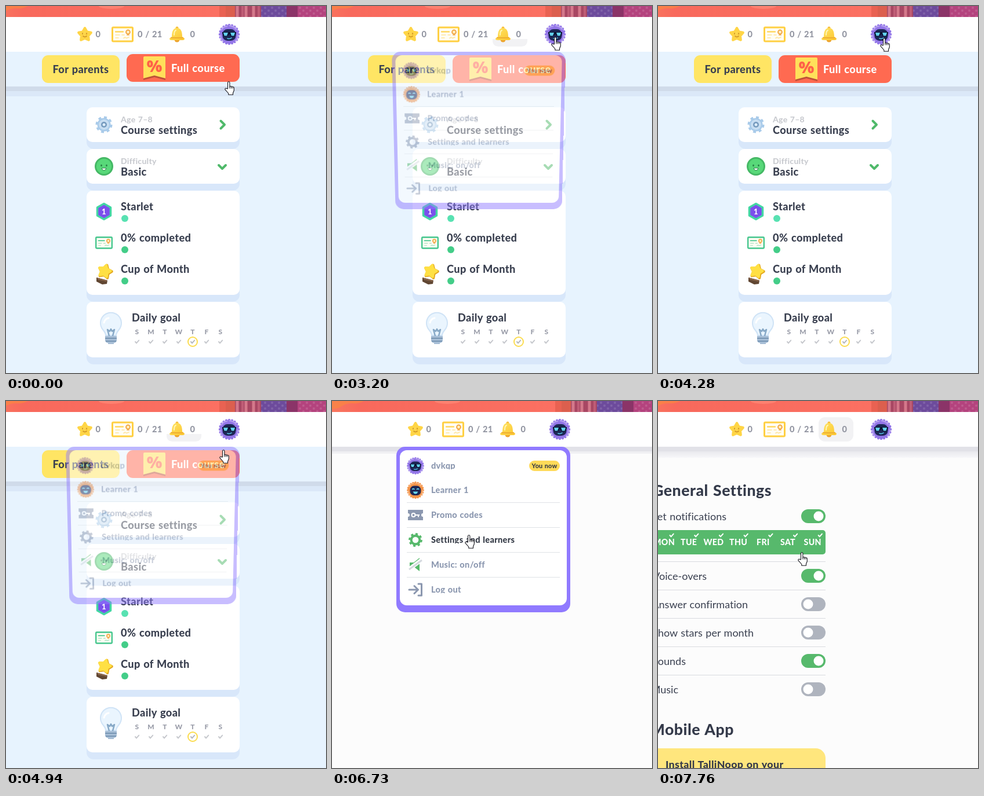
These frames come from a looping animation (552 by 634 pixels, 8000 ms). An HTML page:

```html
<!DOCTYPE html>
<html lang="en">
<head>
<meta charset="utf-8">
<title>Learner menu and settings</title>
<style>
html, body { margin: 0; width: 100%; height: 100%; overflow: hidden; background: #fcfcfc; }
#stage { position: absolute; left: 0; top: 0; width: 552px; height: 634px; overflow: hidden; }
#stage > svg { position: absolute; left: 0; top: 0; }
text {
  font-family: Lato, "Open Sans", sans-serif; font-weight: 800; font-variant-ligatures: none;
  letter-spacing: .02em; word-spacing: .05em;
}
.big { font-size: 18.2px; fill: #3a4050; }
.small { font-size: 14px; fill: #c9cbd0; }
.count { font-size: 14.6px; fill: #9396a2; }
.item { font-size: 14.6px; fill: #8c98b0; }
.label { font-size: 18px; font-weight: 400; fill: #3a4050; text-anchor: end; letter-spacing: 0; }
.title { font-size: 26.6px; fill: #343a4a; text-anchor: end; }
.mid { text-anchor: middle; }
.line { fill: none; stroke-linecap: round; stroke-linejoin: round; }

.anim { animation: 8s step-end -6ms infinite; }
#home { animation-name: home; }
#head { animation-name: head; }
#strip { animation-name: strip; }
#offer { animation-name: offer; }
#haze, #pill { animation-name: late; }
#halfPill { animation-name: halfPill; }
#settings { animation-name: settings; }
#menu { animation-name: menu; transform-origin: 253px 79px; }
#hotText { animation-name: hotText; }
#hotIcon { animation-name: hotIcon; }
#pointer { animation-name: pointer; }
#hand { animation-name: hand; }
#arrow { animation-name: arrow; }

@keyframes home { 0% { opacity: 1 } 84.125% { opacity: 0 } }
@keyframes head { 0% { transform: none } 84.125% { transform: translateX(8px) } 85.875% { transform: none } }
@keyframes strip { 0% { transform: none } 84.125% { transform: translateX(17px) } 85.875% { transform: none } }
@keyframes offer {
  0% { transform: translateY(-2px) } 1.875% { transform: translateY(-1px) } 3.375% { transform: none }
  27.25% { transform: translateY(-1px) } 28.75% { transform: translateY(-2px) }
  30.5% { transform: translateY(-1px) } 32% { transform: none }
}
@keyframes late { 0% { opacity: 0 } 85.875% { opacity: 1 } }
@keyframes halfPill { 0% { opacity: 0 } 40% { opacity: 1 } 49% { opacity: 0 } 61.75% { opacity: 1 } 84.125% { opacity: 0 } }
@keyframes settings { 0% { opacity: 0 } 92.5% { opacity: .4 } 94% { opacity: .75 } 95.5% { opacity: .95 } 97% { opacity: 1 } }
@keyframes menu {
  0% { opacity: 0; transform: none }
  40% { opacity: .5; transform: perspective(700px) rotateX(-6.4deg) }
  41.5% { opacity: .9; transform: perspective(700px) rotateX(-1.2deg) }
  43% { opacity: 1; transform: none }
  46% { opacity: .8; transform: perspective(700px) rotateX(-3deg) }
  47.5% { opacity: .3; transform: perspective(700px) rotateX(-12deg) }
  49% { opacity: 0; transform: none }
  61.75% { opacity: .5; transform: perspective(700px) rotateX(-6.4deg) }
  63.25% { opacity: .9; transform: perspective(700px) rotateX(-1.2deg) }
  64.75% { opacity: 1; transform: none }
  84.125% { opacity: 1; transform: translateX(8px) }
  85.875% { opacity: .8; transform: translateX(8px) perspective(700px) rotateX(-3deg) }
  87.375% { opacity: .3; transform: translateX(8px) perspective(700px) rotateX(-12deg) }
  88.875% { opacity: 0; transform: none }
}
@keyframes hotText { 0% { fill: #8c98b0 } 66.25% { fill: #343a46 } }
@keyframes hotIcon { 0% { color: #8c98b0 } 66.25% { color: #57b96c } }
@keyframes pointer {
  0% { transform: translate(377px, 130px) } 1.875% { transform: translate(381px, 135px) }
  3.375% { transform: translate(388px, 142px) } 4.875% { transform: translate(390px, 145px) }
  25.75% { transform: translate(397px, 135px) } 27.25% { transform: translate(387px, 108px) }
  28.75% { transform: translate(382px, 79px) } 30.5% { transform: translate(378px, 64px) }
  32% { transform: translate(376px, 58px) } 33.75% { transform: translate(377px, 55px) }
  35.25% { transform: translate(378px, 53px) } 46% { transform: translate(377px, 55px) }
  49% { transform: translate(376px, 57px) } 50.5% { transform: translate(372px, 62px) }
  52% { transform: translate(377px, 59px) } 53.5% { transform: translate(383px, 55px) }
  61.75% { transform: translate(368px, 84px) } 63.25% { transform: translate(330px, 132px) }
  64.75% { transform: translate(285px, 186px) } 66.25% { transform: translate(250px, 220px) }
  67.75% { transform: translate(234px, 229px) } 69.25% { transform: translate(229px, 231px) }
  90.75% { transform: translate(234px, 237px) } 92.5% { transform: translate(238px, 247px) }
  94% { transform: translate(240px, 255px) } 95.5% { transform: translate(241px, 259px) }
  97% { transform: translate(241px, 261px) }
}
@keyframes hand { 0% { opacity: 1 } 3.375% { opacity: 0 } 27.25% { opacity: 1 } 90.75% { opacity: 0 } 94% { opacity: 1 } }
@keyframes arrow { 0% { opacity: 0 } 3.375% { opacity: 1 } 27.25% { opacity: 0 } 90.75% { opacity: 1 } 94% { opacity: 0 } }
</style>
</head>
<body>
<div id="stage">
<svg width="552" height="634">
  <defs>
    <linearGradient id="coral"><stop stop-color="#f9775f"/><stop offset=".12" stop-color="#f8695c"/><stop offset="1" stop-color="#fb7062"/></linearGradient>
    <linearGradient id="fade" x2="0" y2="1"><stop stop-color="#e9e9ee"/><stop offset="1" stop-color="#f7f7f9"/></linearGradient>
    <linearGradient id="gold" x2="1" y2="1"><stop stop-color="#ffe566"/><stop offset="1" stop-color="#fcc52f"/></linearGradient>
    <pattern id="dots" width="12" height="10" patternUnits="userSpaceOnUse"><circle cx="3" cy="3" r="2" fill="#fff" opacity=".13"/><circle cx="9" cy="8" r="2" fill="#fff" opacity=".13"/></pattern>
    <path id="star" d="M0-10 3.2-4.4 9.5-3.1 5.2 1.7 5.9 8.1 0 5.5-5.9 8.1-5.2 1.7-9.5-3.1-3.2-4.4Z" stroke-linejoin="round" stroke-width="4"/>
    <path id="check" class="line" d="M-3 0-1 2.4 3.2-2.4" stroke-width="2"/>
    <g id="gear">
      <circle r="9" fill="none" stroke="currentColor" stroke-width="5"/>
      <circle r="12" fill="none" stroke="currentColor" stroke-width="5" pathLength="16" stroke-dasharray="1 1"/>
    </g>
    <g id="diploma">
      <rect x="-17.5" y="-12" width="35" height="24" rx="1.5" fill="#fffdf4" stroke="currentColor" stroke-width="3"/>
      <path class="line" d="M-12-4.5H1" stroke="currentColor" stroke-width="2.2"/>
      <path class="line" d="M-12 1H-5M-1 1H3M-12 6H-7M2 6.500 4.500 5 6.500 6.500 11 5" stroke="currentColor" stroke-width="1.5" opacity=".5"/>
      <path d="M7.5-2H11.500V2.500L9.500 1.500 7.500 2.500Z" fill="#f3b25c"/>
      <circle cx="9.500" cy="-4" r="3.400" fill="#fff0c4" stroke="#f3a847" stroke-width="2"/>
    </g>
    <g id="hair">
      <circle r="16" fill="currentColor"/>
      <circle r="16" fill="none" stroke="currentColor" stroke-width="4.500" stroke-linecap="round" pathLength="20" stroke-dasharray="0 1"/>
      <path class="line" d="M-13-8Q-10-14-4-14M1-15Q8-14 12-9M-15 2Q-15 8-11 12M15 1Q15 8 11 12" stroke="#fff" stroke-width="2.500" opacity=".28"/>
      <rect x="-11.5" y="-9" width="23" height="20" rx="8.500" fill="#1d2755"/>
    </g>
    <g id="cool">
      <use href="#hair"/>
      <path d="M-12-4H12V-2L10 3Q6 5 2 2L0-1-2 2Q-6 5-10 3L-12-2Z" fill="#0b1330"/>
      <path d="M-10-3H-2L-4 2.4H-8.500ZM2-3H10L8.500 2.400H4Z" fill="#62d0ee"/>
      <path class="line" d="M-3 7Q1 8.500 4 6" stroke="#59d2f0" stroke-width="1.6"/>
    </g>
    <g id="calm">
      <use href="#hair"/>
      <path class="line" d="M-6.5-2Q-4.500-4-2.500-2M3-2Q5-4 7-2" stroke="#67d8f4" stroke-width="2"/>
      <path d="M-5 3H5Q4 8 0 8T-5 3Z" fill="#67d8f4"/>
    </g>
  </defs>
  <rect width="552" height="634" fill="#fcfcfc"/>
  <rect y="79" width="552" height="8" fill="#e2e2e8"/>
  <rect y="87" width="552" height="4" fill="#f0f0f3"/>
  <rect id="haze" class="anim" y="87" width="552" height="11" fill="url(#fade)"/>

  <g id="home" class="anim">
    <rect y="79" width="552" height="555" fill="#e7f3fe"/>
    <rect y="139" width="552" height="8" fill="#d0dbea"/>
    <rect y="147" width="552" height="9" fill="#dbe8f8"/>
    <rect x="62" y="85" width="134" height="48" rx="11" fill="#ffe564"/>
    <text class="big" x="80.5" y="116">For parents</text>
    <g id="offer" class="anim">
      <rect x="208" y="85" width="195" height="48" rx="11" fill="#ff6a51"/>
      <path d="M237 123 256 118 275 123V130L256 125 237 130Z" fill="#bd5138"/>
      <path d="M237 91Q237 89 239 89H273Q275 89 275 91V127L256 122 237 127Z" fill="#ffe05a"/>
      <text class="mid" x="256" y="116" font-size="28" fill="#ff6148" style="font-family:'Open Sans',sans-serif;letter-spacing:0">%</text>
      <text class="big" x="285" y="116" style="fill:#fff">Full course</text>
    </g>
    <g id="cards"></g>

    <text class="small" x="198" y="201">Age 7–8</text>
    <text class="big" x="198" y="221">Course settings</text>
    <text class="small" x="198" y="273">Difficulty</text>
    <text class="big" x="198" y="293">Basic</text>
    <text class="big" x="198" y="353">Starlet</text>
    <text class="big" x="198" y="407">0% completed</text>
    <text class="big" x="198" y="461">Cup of Month</text>
    <text class="big" x="217" y="545">Daily goal</text>
    <path class="line" d="M370.500 198.500 377 205 370.500 211.500M367 275 373 281 379 275" stroke="#4fb96a" stroke-width="4"/>
    <circle cx="205" cy="367" r="6" fill="#58e2b2"/>
    <circle cx="205" cy="421" r="6" fill="#43cd88"/>
    <circle cx="205" cy="475" r="6" fill="#43cd88"/>

    <g transform="translate(169 205)" color="#a9cbea">
      <use href="#gear"/><circle r="9" fill="#c8def2"/><circle r="5" fill="#7499bd"/><circle r="2.5" fill="#dcecfa"/>
    </g>
    <g transform="translate(169 277)">
      <circle r="16" fill="#45b865"/><circle r="13" fill="#58d879"/>
      <path class="line" d="M-4.500-2V-1M4.500-2V-1" stroke="#277d45" stroke-width="2.4"/>
      <path d="M-4 3H4Q3 7 0 7T-4 3Z" fill="#fff" stroke="#277d45"/>
    </g>
    <g transform="translate(169 355)">
      <path d="M0-13.500 11.500-7V7L0 13.500-11.500 7V-7Z" fill="#7b50ec" stroke="#43d7a3" stroke-width="3.500" stroke-linejoin="round"/>
      <text class="mid" y="5" font-size="13" fill="#fff">1</text>
    </g>
    <use href="#diploma" transform="translate(169 409) scale(.79)" color="#43c58c"/>
    <g transform="translate(169 461)">
      <path d="M-13 8 6 13 5 19-3 20-13 15Z" fill="#604632"/>
      <path d="M-13 8 6 13 4 15-10 12Z" fill="#87644a"/>
      <use href="#star" transform="translate(2 -2) rotate(16) scale(1.150)" fill="#e4a91f" stroke="#e4a91f"/>
      <use href="#star" transform="translate(1 -3) rotate(16) scale(1.060)" fill="#ffe044" stroke="#ffe044"/>
    </g>
    <g transform="translate(181 552)">
      <path d="M-9 17Q-9 13-14 7A18 18 0 1 1 14 7Q9 13 9 17Z" fill="#eaf5fe" stroke="#cfe3f6" stroke-width="2"/>
      <path class="line" d="M-12-5Q-10-12-4-13" stroke="#fff" stroke-width="3"/>
      <path class="line" d="M-3 18-6 7-2 10 0 6 2 10 6 7 3 18" stroke="#86a8c6" stroke-width="2.500"/>
      <path d="M-10 18H10V26Q9 30 5 30V32H-5V30Q-9 30-10 26Z" fill="#a7bed6"/>
      <path d="M-10 22H10M-9 27H9" stroke="#7896b4" stroke-width="2"/>
    </g>
    <g id="days"></g>
    <circle cx="322" cy="580" r="8" fill="none" stroke="#fbdc4e" stroke-width="2"/>
  </g>

  <g id="settings" class="anim">
    <text class="title" x="196" y="164">General Settings</text>
    <rect x="-20" y="223" width="309" height="42" rx="5" fill="#57b96c"/>
    <g id="week"></g>
    <g id="options"></g>
    <text class="title" x="131" y="577">Mobile App</text>
    <rect x="-20" y="600" width="309" height="60" rx="17" fill="#ffe67d"/>
    <text x="13" y="634" font-size="17.800" fill="#343a4a">Install TalliNoop on your</text>
  </g>

  <rect y="19" width="552" height="60" fill="#fff"/>
  <g id="strip" class="anim">
    <rect x="-17" width="386" height="19" fill="url(#coral)"/>
    <path d="M-17 0H38Q30 5 18 4T-5 12L-17 14Z" fill="#fc8a3c" opacity=".6"/>
    <ellipse cx="182" cy="0" rx="22" ry="5" fill="#ff8a78" opacity=".7"/>
    <rect x="368" width="27" height="19" fill="#e96252"/>
    <rect x="379" width="16" height="19" fill="#dc5f4e"/>
    <rect x="395" width="45" height="19" fill="#a84763"/>
    <path d="M399 0V19M414 0V19M427 0V19" stroke="#d4798b" stroke-width="5"/>
    <path d="M408 0V19M436 0V19" stroke="#bf5d76" stroke-width="4"/>
    <rect x="440" width="45" height="19" fill="#6d4b9c"/>
    <rect x="484" width="19" height="19" fill="#8b3468"/>
    <rect x="503" width="60" height="19" fill="#b4437e"/>
    <rect x="440" width="44" height="19" fill="url(#dots)"/>
    <rect x="503" width="60" height="19" fill="url(#dots)"/>
  </g>
  <g id="head" class="anim">
    <rect id="pill" class="anim" x="277" y="28" width="60" height="42" rx="11" fill="#f2f2f4"/>
    <path id="halfPill" class="anim" d="M277 57H337V59Q337 70 326 70H288Q277 70 277 59Z" fill="#f2f2f4"/>
    <use href="#star" transform="translate(136 49.500) scale(1.120)" fill="url(#gold)" stroke="#ffd546"/>
    <path class="line" d="M132 47V48.500M139 47V48.500M133 52Q136 55 139 52" stroke="#c98d22" stroke-width="1.600"/>
    <text class="count" x="154.500" y="54">0</text>
    <use href="#diploma" x="201" y="49" color="#ffd043"/>
    <text class="count" x="227" y="54">0 / 21</text>
    <g transform="translate(295 49)">
      <circle cy="9" r="4.500" fill="#eda52f"/>
      <circle cy="-11" r="2.500" fill="#f7be3b"/>
      <path d="M-9 4Q-9-11 0-11T9 4L13 7Q13 10 10 10H-10Q-13 10-13 7Z" fill="url(#gold)"/>
      <path class="line" d="M-10 6H10" stroke="#eeae31" stroke-width="2"/>
      <path class="line" d="M-5 1Q-5-6-2-7" stroke="#fff5b4" stroke-width="2"/>
    </g>
    <text class="count" x="317.500" y="54">0</text>
    <use href="#cool" x="385" y="49" color="#9376e8"/>
  </g>
</svg>

<svg id="menu" class="anim" width="552" height="634">
  <rect x="103" y="79" width="300" height="286" rx="15" fill="#907aff"/>
  <rect x="109" y="85" width="288" height="268" rx="12" fill="#fff"/>
  <use href="#cool" transform="translate(136 112) scale(.82)" color="#9376e8"/>
  <use href="#calm" transform="translate(136 154) scale(.82)" color="#f49348"/>
  <path d="M121 175.500H385M121 218.500H385M121 261.500H385M121 304.500H385" stroke="#dfe2e6"/>
  <rect x="332" y="103" width="53" height="18" rx="9" fill="#ffda59"/>
  <text class="mid" x="358.500" y="116" font-size="10.800" fill="#343a46">You now</text>
  <text class="item" x="163" y="117">dvkqp</text>
  <text class="item" x="163" y="159">Learner 1</text>
  <text class="item" x="163" y="202">Promo codes</text>
  <text class="item anim" id="hotText" x="163" y="245">Settings and learners</text>
  <text class="item" x="163" y="288">Music: on/off</text>
  <text class="item" x="163" y="331">Log out</text>
  <path d="M160 118H325V124H160ZM160 246H325V252H160ZM160 332H325V338H160Z" fill="#fff"/>
  <path d="M123 188H149V194A3 3 0 0 0 149 200V206H123V200A3 3 0 0 0 123 194Z" fill="#8c98b0"/>
  <circle cx="132.500" cy="197" r="3" fill="none" stroke="#fff" stroke-width="2"/>
  <path d="M135.500 197H143M141 197V200.500" stroke="#fff" stroke-width="2"/>
  <g id="hotIcon" class="anim"><use href="#gear" transform="translate(136 240) scale(.82)"/></g>
  <path d="M143 271V294L134 287H126V279H133Z" fill="#57b96c"/>
  <path d="M123 292 147 274" stroke="#fff" stroke-width="7"/>
  <path d="M125 291 147 275" stroke="#d5d9df" stroke-width="3"/>
  <path class="line" d="M125 326H140M134 319.500 140.500 326 134 332.500M141 316H146.500V336H141" stroke="#8c98b0" stroke-width="3"/>
</svg>

<svg id="pointer" class="anim" width="24" height="28">
  <g stroke-width="1.100" stroke="#15151c" fill="#fff" stroke-linejoin="round">
    <g id="hand" class="anim">
      <path d="M5.500 13V2.500a1.700 1.700 0 0 1 3.400 0V9a1.600 1.600 0 0 1 2.600.4a1.600 1.600 0 0 1 2.500.6a1.500 1.500 0 0 1 2.300 1.300V16l-1.800 4.500V23.300H6.800V21L1.200 14.600C.1 12.700 2.300 11.200 3.600 12.600Z"/>
      <path d="M8.900 9V12.500M11.500 9.500V12.500M14 10.500V12.500"/>
    </g>
    <path id="arrow" class="anim" d="M.6.6V16.600L4.300 13.300 6.900 19.300 9.400 18.200 6.900 12.300H11.800Z"/>
  </g>
</svg>
</div>
<script>
const fill = (id, items, draw) => {
  document.getElementById(id).innerHTML = items.map(draw).join('');
};

// top and height of each white card
fill('cards', [[175, 60], [247, 60], [319, 180], [511, 96]], ([y, h]) =>
  `<rect x="139" y="${y + 6}" width="264" height="${h + 6}" rx="12" fill="#d8e7fa"/>
   <rect x="139" y="${y}" width="264" height="${h}" rx="10" fill="#fff"/>`);

fill('days', [...'SMTWTFS'], (day, i) => {
  const x = 226 + 24 * i;
  return `<text class="mid" x="${x}" y="567" font-size="12" fill="#999ca8">${day}</text>
    <use href="#check" x="${x}" y="580" stroke="${i === 4 ? '#b5b8bf' : '#c6c8cd'}"/>`;
});

fill('week', ['MON', 'TUE', 'WED', 'THU', 'FRI', 'SAT', 'SUN'], (day, i) => {
  const x = 10.5 + 42.7 * i;
  return `<text class="mid" x="${x}" y="249" font-size="14.200" fill="#fff">${day}</text>
    <use href="#check" x="${x + 13}" y="232" stroke="#fff"/>`;
});

// label, its right edge, centre line, switched on
fill('options', [
  ['Get notifications', 118, 199, 1], ['Voice-overs', 84, 302, 1],
  ['Answer confirmation', 155, 351, 0], ['Show stars per month', 165, 400, 0],
  ['Sounds', 48, 449, 1], ['Music', 35, 498, 0]
], ([label, x, y, on], i) =>
  `<text class="label" x="${x}" y="${y + 7}">${label}</text>
   <rect x="247" y="${y - 12}" width="42" height="24" rx="12" fill="${on ? '#57b96c' : '#afb4be'}"/>
   <circle cx="${on ? 277 : 259}" cy="${y}" r="8.500" fill="#fff"/>
   ${i ? `<path d="M0 ${y - 24.5}H289" stroke="#d9dbdf"/>` : ''}`);
</script>
</body>
</html>
```
